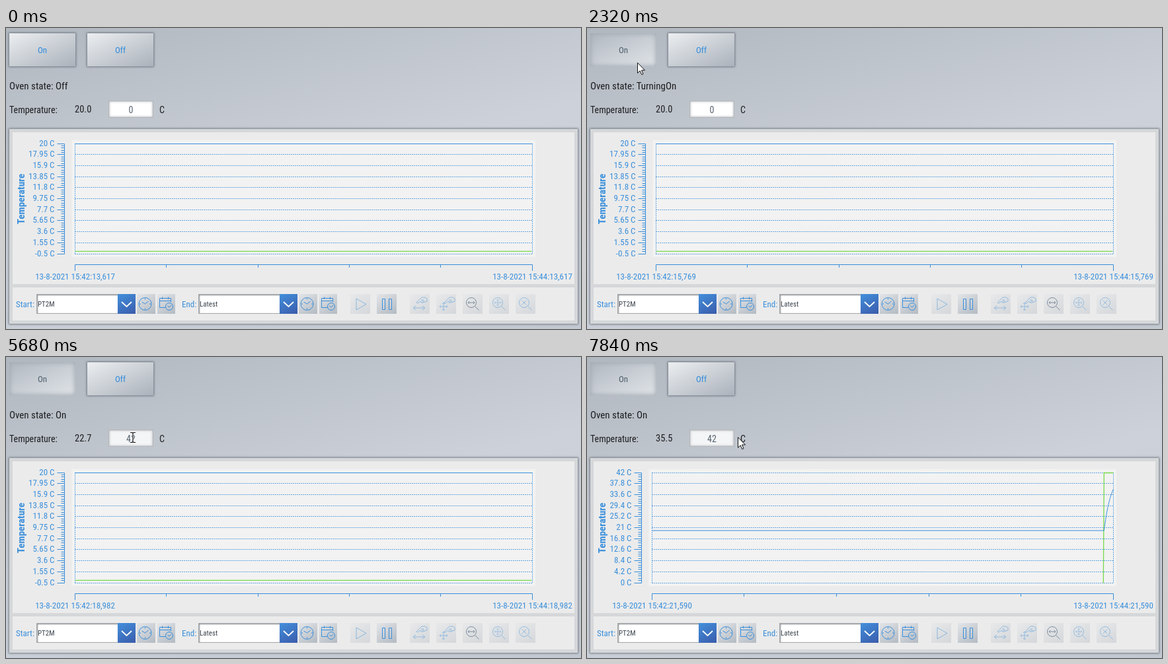
Animation of 870x456 px, one loop 8 s. Source, as an HTML page:

```html
<!DOCTYPE html>
<html lang="en">
<head>
<meta charset="utf-8">
<title>Oven panel</title>
<style>
html, body { margin: 0; width: 100%; height: 100%; overflow: hidden; }
body { position: relative; background: linear-gradient(165deg, #b0b7bf, #cdd2da 50%, #c3c9d1);
  font: 13px "Roboto Condensed", Roboto, sans-serif; font-stretch: 75%; color: #1d1d1f; }
body > * { position: absolute; box-sizing: border-box; }
svg { left: 0; top: 0; width: 870px; height: 456px; }
.btn { top: 8px; width: 100px; height: 50px; line-height: 51px; text-align: center; color: #2e8ade;
  background: linear-gradient(155deg, #eceef0, #aab2bb); box-shadow: 0 0 3px 1px #6f7780; }
#on.half { box-shadow: 0 0 2px #8c949c, inset 0 0 4px #a0a8b0; }
#on.down { color: #4c5b6a; background: linear-gradient(155deg, #b0b8c0, #e0e4e8);
  box-shadow: inset 0 0 7px 1px #a2aab2; }
.label { font-size: 15px; line-height: 20px; white-space: pre; }
#field { left: 155px; top: 110px; width: 68px; height: 26px; line-height: 28px; text-align: center; font-size: 14px;
  color: #566270; background: #fff; box-shadow: inset 0 0 0 1px #b4b7ba, inset 0 0 3px 2px #c4c7ca; }
#field.focus { background: #f4f5f6; }
#panel { left: 5px; top: 153px; width: 860px; height: 295px; background: #d5d7d9; box-shadow: 0 0 3px 1px #737a82; }
.pane { left: 10px; width: 850px; background: #ebebeb; }
.input { top: 403px; width: 124px; height: 30px; line-height: 32px; padding-left: 2px; font-size: 11px;
  color: #3b444d; background: #fff; box-shadow: inset 0 0 0 1px #a4a7aa, inset 1px 1px 2px 1px #8d9194; }
.drop { top: 403px; width: 27px; height: 30px; background: linear-gradient(150deg, #4390dc, #3a5bab); }
.tool { top: 403px; height: 30px; background: linear-gradient(145deg, #e3e5e8, #b3bac2); }
.tool.dim { opacity: .4; }
text { fill: #3a8fdb; }
</style>
</head>
<body>
<div class="btn" id="on" style="left:5px">On</div>
<div class="btn" style="left:123px">Off</div>
<div class="label" id="state" style="left:5px;top:78px"></div>
<div class="label" style="left:5px;top:114px;font-size:14px">Temperature:</div>
<div class="label" id="temp" style="left:104px;top:114px;font-size:14.500px"></div>
<div id="field"></div>
<div class="label" style="left:232px;top:114px;font-size:14px">C</div>
<div id="panel"></div>
<div class="pane" style="top:158px;height:230px"></div>
<div class="pane" style="top:393px;height:50px"></div>
<div class="input" style="left:46px">PT2M</div>
<div class="input" style="left:291px">Latest</div>
<svg id="art" viewBox="0 0 870 456">
  <defs>
    <g id="clock"><circle cx="13.500" cy="15" r="9.500"/><path d="M8.500 12l5 3 5-4M13.500 6.500v2M13.500 21.500v2M5 15h2M20 15h2"/></g>
    <g id="date"><path d="M13 20.500H4.500V6.500H21.500V12M4.500 10.500H21.500M8.500 4.500V8M17.500 4.500V8"/><circle cx="19" cy="19" r="5.500"/><path d="M16.500 18l2.500 2 3-3"/></g>
    <g id="lens"><circle cx="13" cy="13" r="7.500"/><path d="M18.500 18.500l6 6"/></g>
    <path id="hand" d="M10 13l5-5 3-3h5l3 2v4l-3 1-3 1h-3l-1-2-4 3zM17 9h4M18 11h4"/>
    <path id="wide" d="M0 0H18M4-3L0 0 4 3M14-3L18 0 14 3"/>
    <path id="cross" d="M-6 0H6M0-6V6M-4-2L-6 0-4 2M4-2L6 0 4 2M-2-4L0-6 2-4M-2 4L0 6 2 4"/>
    <path id="ibeam" d="M-4-7.500H-1L0-6.500 1-7.500H4M0-7V7M-4 7.500H-1L0 6.500 1 7.500H4"/>
  </defs>
  <text x="15" y="423">Start:</text>
  <text x="266" y="423">End:</text>
  <g id="icons" fill="none" stroke="#3a8fdb"></g>
  <text transform="translate(28 259) rotate(-90)" text-anchor="middle" font-size="15" font-weight="700">Temperature</text>
  <g id="chart"></g>
  <g id="arrow"><path d="M.5 .7V16.300L4.200 12.900 6.800 18.600 9 17.600 6.500 12H11.500Z" fill="#fff" stroke="#111" stroke-linejoin="round"/></g>
  <g id="beam" fill="none"><use href="#ibeam" stroke="#fff" stroke-width="2.600"/><use href="#ibeam" stroke="#111" stroke-width="1.200"/></g>
</svg>
<script>
const $ = id => document.getElementById(id);
const LOOP = 8000, TOP = 175.5, BOTTOM = 342.5, RIGHT = 796.5, BLUE = '#3a8fdb';

// Toolbar
const use = (id, x = 0, y = 0) => `<use href="#${id}" x="${x}" y="${y}"/>`;
const box = (cls, x, w) => {
  const el = document.createElement('div');
  el.className = cls;
  el.style.cssText = `left:${x}px;width:${w}px`;
  document.body.insertBefore(el, $('art'));
};
let icons = '';
const icon = (x, body, alpha = 1) => icons += `<g transform="translate(${x} 403)" opacity="${alpha}">${body}</g>`;
for (const x of [169, 414]) {
  box('drop', x, 27);
  icon(x, '<path d="M6 12l7.500 7 7.500-7" stroke="#fff" stroke-width="1.800"/>');
  box('tool', x + 29, 28);
  icon(x + 28, use('clock'));
  box('tool', x + 60, 27);
  icon(x + 59, use('date'));
}
const tools = [
  [521, '<path d="M9 7L24 15.500 9 24Z"/>', .5],
  [561, '<path d="M8.500 7.500h4v16h-4zM18.500 7.500h4v16h-4z"/>', 1],
  [611, use('hand') + use('wide', 5, 21), .45],
  [651, use('hand', 2) + use('cross', 11, 19), .45],
  [691, `<g stroke="#5d7186">${use('lens')}<path d="M8 13H18M10 11l-2 2 2 2M16 11l2 2-2 2"/></g>`, .75],
  [731, use('lens') + `<g transform="translate(13 13) scale(.8)">${use('cross')}</g>`, .45],
  [771, use('lens') + '<path d="M9.500 9.500l7 7m0-7l-7 7"/>', .45]
];
for (const [x, body, alpha] of tools) {
  box(alpha < 1 ? 'tool dim' : 'tool', x, 30);
  icon(x, body, alpha);
}
$('icons').innerHTML = icons;

// Timed values: the last entry whose time has passed
const at = (list, t) => list.filter(e => e[0] <= t).pop()[1];
const stamps = [[0, 13617], [480, 14130], [1000, 14607], [1560, 15180], [2080, 15769], [2600, 16320],
  [3080, 16870], [3560, 17390], [4080, 17920], [4640, 18450], [5200, 18982], [5720, 19480],
  [6200, 19985], [6720, 20487], [7280, 21030], [7840, 21590]];
const states = [[0, 'Off'], [1840, 'TurningOn'], [2560, 'On']];
const inputs = [[0, '0'], [3800, ''], [4880, '4'], [5120, '42']];
const ticks = [[0, 0], [5680, .255], [6200, .775], [6720, 1.295], [7200, 1.815], [7760, 2.335]];
const heat = s => 42 - 22 * Math.exp(-.523 * Math.max(0, s));
const START = 19150;

function drawChart(t, stamp) {
  const hot = t >= 5720, left = hot ? 98.5 : 104.5, axis = left - 16, width = RIGHT - left;
  const [lo, hi] = hot ? [0, 42] : [-.5, 20];
  const yOf = v => BOTTOM - (v - lo) / (hi - lo) * (BOTTOM - TOP);
  const xOf = ms => RIGHT - (stamp - ms) / 120000 * width;
  let out = `<path d="M${left - 5} 170H801V347H${left - 5}Z" fill="#f2f2f2"/>`;
  let dots = `M${left} ${TOP - .5}V${BOTTOM}M${RIGHT} ${TOP - .5}V${BOTTOM}`, solid = `M${axis} ${TOP}V${BOTTOM}`;
  for (let i = 0; i <= 50; i++) {
    const y = Math.floor(TOP + i * 3.34 - .5) + .5, major = i % 5 === 0;
    solid += `M${axis - (major ? 11 : 5)} ${y}H${axis}`;
    if (!major) continue;
    dots += `M${left - .5} ${y}H${RIGHT}`;
    const v = +(hi - (hi - lo) * i / 50).toFixed(2);
    out += `<text x="${left - 31}" y="${y + 3.5}" text-anchor="end">${v} C</text>`;
  }
  solid += `M${left} 368V358.500H${RIGHT}V368`;
  for (let i = 1; i < 5; i++) solid += `M${Math.round(left - .7 + width * i / 5) + .5} 358V363`;
  out += `<path d="${dots}" fill="none" stroke="${BLUE}" stroke-dasharray="2 1" opacity=".75"/>
    <path d="${solid}" fill="none" stroke="${BLUE}"/>`;

  let green = `M${left} ${yOf(0)}H${RIGHT - 1}`, blue = `M${left} ${yOf(20)}H${RIGHT}`;
  if (hot) {
    const x = xOf(START);
    green = `M${x - 1} ${BOTTOM}L${x} ${TOP}H${RIGHT}`;
    blue = `M${left} ${yOf(20)}H${x}`;
    for (let ms = START; ms < stamp; ms += 100) blue += `L${xOf(ms)} ${yOf(heat((ms - START) / 1000))}`;
  }
  out += `<path d="${green}" fill="none" stroke="#78d94c" stroke-width="1.300"/>
    <path d="${blue}" fill="none" stroke="${BLUE}"/>`;
  const date = min => `13-8-2021 15:${min}:${Math.floor(stamp / 1000)},${String(stamp % 1000).padStart(3, '0')}`;
  out += `<text x="${left}" y="381" text-anchor="middle">${date(42)}</text>
    <text x="${RIGHT}" y="381" text-anchor="middle">${date(44)}</text>`;
  $('chart').innerHTML = out;
}

// Pointer position, advancing in even steps between two times
const stepped = (t, from, to, n) => Math.min(1, Math.floor((t - from) / (to - from) * n + 1e-6) / n);
const mix = (a, b, k) => a + (b - a) * k;
function pointer(t) {
  if (t < 240) return null;
  if (t < 1080) {
    const k = 1 - (1 - stepped(t, 240, 1000, 9)) ** 2;
    return [mix(300, 85, k), mix(428, 58, k)];
  }
  if (t < 1160) return [76, 52];
  if (t < 2320) return [70, 48];
  if (t < 6200) {
    const k = stepped(t, 2320, 2920, 8), e = k * k * (3 - 2 * k);
    return [mix(76, 192, e), mix(52, 122, e)];
  }
  const k = stepped(t, 6120, 6360, 3);
  return [mix(192, 228, k), mix(122, 121, k)];
}

let shown = '';
function frame(now) {
  const t = now % LOOP, stamp = at(stamps, t);
  $('on').className = 'btn' + (t >= 1640 ? ' down' : t >= 1440 ? ' half' : '');
  $('state').textContent = 'Oven state: ' + at(states, t);
  $('temp').textContent = heat(at(ticks, t)).toFixed(1);
  $('field').textContent = at(inputs, t);
  $('field').className = t >= 3480 ? 'focus' : '';
  const key = stamp + '/' + (t >= 5720);
  if (key !== shown) drawChart(t, stamp);
  shown = key;
  const p = pointer(t), text = p && p[0] > 155 && p[0] < 223 && p[1] > 110 && p[1] < 136;
  $('arrow').style.display = p && !text ? '' : 'none';
  $('beam').style.display = text ? '' : 'none';
  if (p) $(text ? 'beam' : 'arrow').setAttribute('transform', `translate(${p.map(Math.round)})`);
  requestAnimationFrame(frame);
}
requestAnimationFrame(frame);
</script>
</body>
</html>
```
